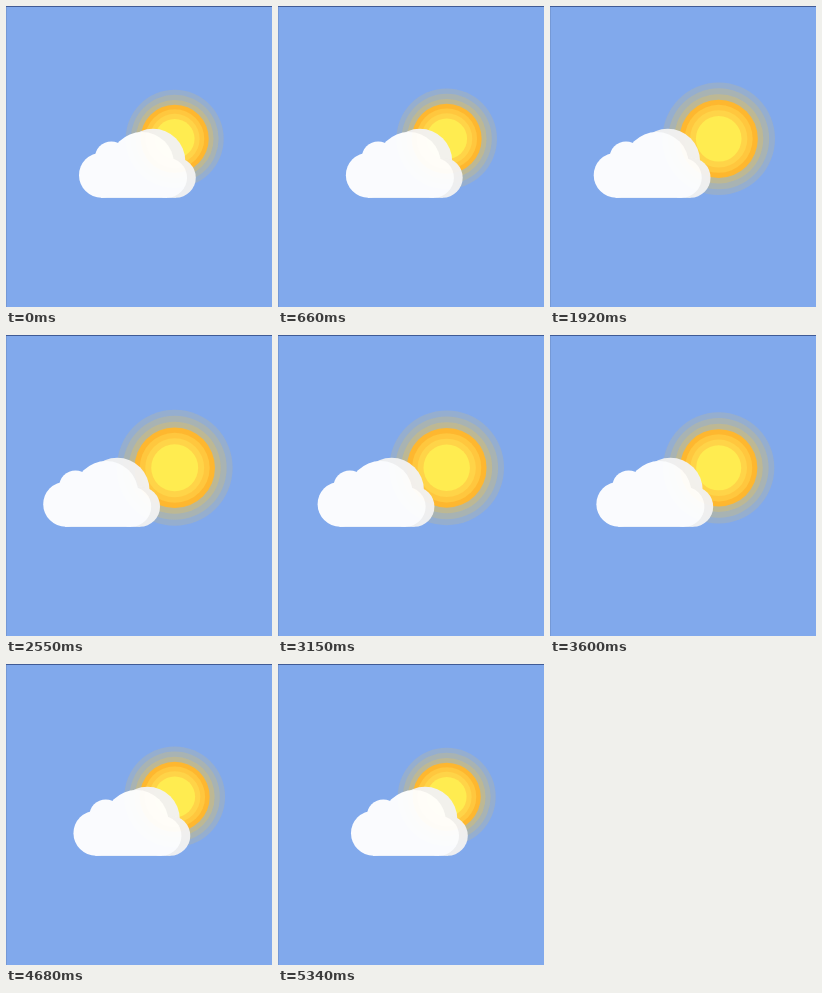
An HTML page for the animation above (5.37 s loop, 266 by 301 pixels).

```html
<!DOCTYPE html>
<html lang="en">
<head>
<meta charset="utf-8">
<title>Sun and cloud</title>
<style>
  html, body { margin: 0; width: 100%; height: 100%; overflow: hidden; background: #81a9ec; }
  svg { display: block; width: 100vw; height: 100vh; }
</style>
</head>
<body>
<svg viewBox="0 0 266 301">
  <rect width="266" height="301" fill="#81a9ec"/>
  <rect width="1" height="301" fill="#7599d6"/>
  <rect width="266" height="1" fill="#405b95"/>
  <g id="sun">
    <g fill="#f5c544">
      <circle r="58" opacity=".17"/>
      <circle r="52" opacity=".2"/>
      <circle r="46" opacity=".28"/>
    </g>
    <circle r="40.3" fill="#feb72f"/>
    <circle r="35" fill="#ffc73e"/>
    <circle r="29.5" fill="#ffd448"/>
    <circle r="23.5" fill="#ffec50"/>
  </g>
  <g id="cloud" opacity=".965">
    <g fill="#f2f2f2">
      <circle cx="147" cy="155" r="32.3"/>
      <circle cx="169.8" cy="171.7" r="20"/>
      <rect x="95" y="165" width="75" height="26.7"/>
    </g>
    <g fill="#fff">
      <circle cx="95.5" cy="169.2" r="22.5"/>
      <circle cx="105.3" cy="152" r="16.5"/>
      <circle cx="136" cy="158" r="32"/>
      <circle cx="161" cy="171.7" r="20"/>
      <rect x="95" y="160" width="66" height="31.7"/>
    </g>
  </g>
</svg>
<script>
  const LOOP = 5370;
  const sun = document.getElementById('sun');
  const cloud = document.getElementById('cloud');

  function draw(now) {
    // 0 at the loop ends, 1 halfway
    const swing = (1 - Math.cos(2 * Math.PI * (now % LOOP) / LOOP)) / 2;
    const scale = 0.845 + 0.155 * swing;
    sun.setAttribute('transform', `translate(168.7 132.8) scale(${scale})`);
    cloud.setAttribute('transform', `translate(${-36 * swing} 0)`);
  }

  const start = performance.now();
  function tick() {
    draw(performance.now() - start);
    requestAnimationFrame(tick);
  }
  tick();
</script>
</body>
</html>
```
